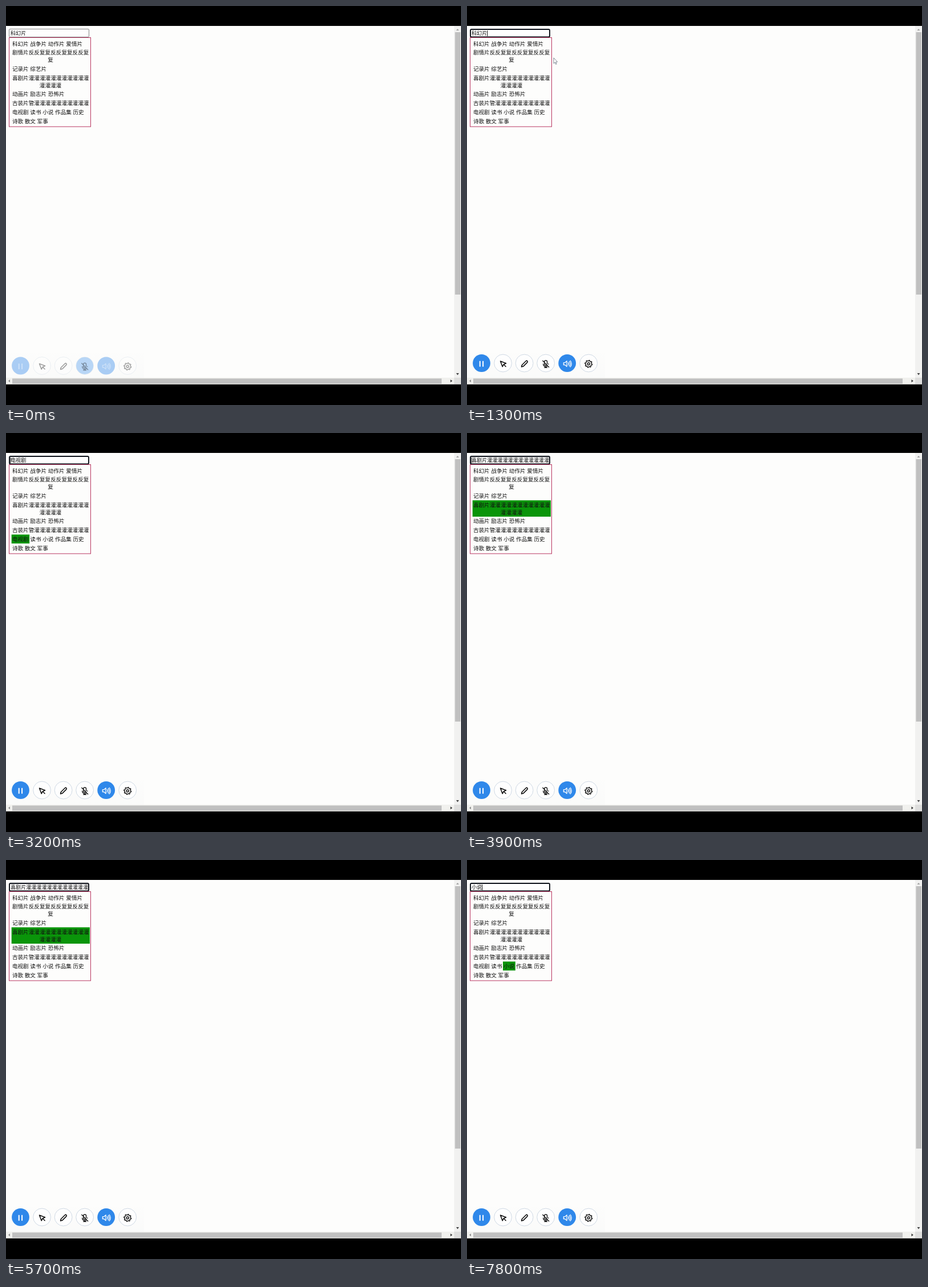
Recreate the animation shown at these times as an HTML page with a canvas. Size 798x701 px, loop 8 s.

```html
<!DOCTYPE html>
<html lang="zh">
<head>
<meta charset="utf-8">
<style>
html, body { margin: 0; width: 100%; height: 100%; overflow: hidden; background: #000; }
canvas { display: block; width: 798px; height: 701px; }
</style>
</head>
<body>
<canvas id="stage"></canvas>
<script>
const W = 798, H = 701, LOOP = 8000;
const canvas = document.getElementById('stage');
const dpr = window.devicePixelRatio || 1;
canvas.width = W * dpr;
canvas.height = H * dpr;
const ctx = canvas.getContext('2d');

const FONT = '"Noto Sans CJK SC", "Noto Sans CJK", sans-serif';
const PAGE = '#fdfdfc', BLUE = '#2f88ea', INK = '#111';
const CHAR = 9.62, PITCH = 15.72, WRAP = 13;

const ROWS = [
  ['科幻片', '战争片', '动作片', '爱情片'],
  ['剧情片反反复复反反复复反反复复'],
  ['记录片', '综艺片'],
  ['喜剧片' + '灌'.repeat(15)],
  ['动画片', '励志片', '恐怖片'],
  ['古装片管' + '灌'.repeat(10)],
  ['电视剧', '读书', '小说', '作品集', '历史'],
  ['诗歌', '散文', '军事']
];

// Lay the words out in rows, long ones wrapped after 14 characters
const items = [];
const rowStart = [];
let rowY = 58.1;
for (const row of ROWS) {
  let x = 9.7;
  rowStart.push(items.length);
  for (const text of row) {
    const lines = text.length > 14 ? [text.slice(0, 14), text.slice(14)] : [text];
    const w = lines[0].length * CHAR + 2.6;
    items.push({ text, lines, x, y: rowY, w, h: PITCH + (lines.length - 1) * WRAP });
    x += w;
  }
  rowY += items[items.length - 1].h;
}

// Key presses: [time, item index, caret at end]
const keys = [];
const press = (t, i, atEnd) => keys.push([t, i, atEnd]);
[2000, 2200, 2300, 2400, 2600, 2700, 3000, 3100].forEach((t, r) => press(t, rowStart[r], true));
[3200, 3300, 3400, 3500, 3600, 3900, 4000, 4100, 4200, 4300, 4400, 4500, 4600]
  .forEach((t, n) => press(t, 12 - n, false));
press(4900, 1, true);
press(5000, 2, true);
[5300, 5500, 5700, 5800, 6000, 6800].forEach((t, n) => press(t, rowStart[n + 1], true));
press(7500, 13, true);
press(7800, 14, true);

const FOCUS = 300, SETTLED = 800, HIDE = 2000;
const clamp = v => Math.max(0, Math.min(1, v));
const ease = v => { v = clamp(v); return v * v * (3 - 2 * v); };
const mix = (a, b, p) => a + (b - a) * p;

function box(x, y, w, h, color) {
  ctx.fillStyle = color;
  ctx.fillRect(x, y, w, h);
}

function label(text, x, y, size, align = 'left') {
  ctx.font = size + 'px ' + FONT;
  ctx.textAlign = align;
  ctx.textBaseline = 'alphabetic';
  ctx.fillStyle = INK;
  ctx.fillText(text, x, y);
}

function poly(points, fill, stroke, width = 1) {
  ctx.beginPath();
  points.forEach(([x, y]) => ctx.lineTo(x, y));
  ctx.closePath();
  if (fill) { ctx.fillStyle = fill; ctx.fill(); }
  if (stroke) { ctx.strokeStyle = stroke; ctx.lineWidth = width; ctx.stroke(); }
}

function path(d, color, width = 1.5) {
  ctx.strokeStyle = color;
  ctx.lineWidth = width;
  ctx.lineCap = ctx.lineJoin = 'round';
  ctx.stroke(new Path2D(d));
}

function disc(r, fill, edge) {
  ctx.beginPath();
  ctx.arc(0, 0, r, 0, 7);
  if (fill) { ctx.fillStyle = fill; ctx.fill(); }
  if (edge) { ctx.strokeStyle = edge; ctx.lineWidth = 1; ctx.stroke(); }
}

function drawScrollbars() {
  box(786, 35, 12, 618, '#f1f1f0');
  box(0, 653, 786, 11.5, '#f1f1ee');
  box(786, 653, 12, 11.5, '#dededd');
  box(787.5, 46, 9.5, 461, '#c0c0c0');
  box(11, 654.5, 753, 9, '#c0c0c0');
  poly([[789.5, 43], [792, 40], [794.5, 43]], '#a0a0a0');
  poly([[789.5, 645], [794.5, 645], [792, 648.5]], '#444');
  poly([[7, 656.3], [7, 661.3], [4, 658.8]], '#8c8c8c');
  poly([[779.5, 656.3], [779.5, 661.3], [782.8, 658.8]], '#333');
}

function drawInput(text, focused, caretOn, atEnd) {
  ctx.beginPath();
  if (focused) {
    ctx.roundRect(6, 41, 139, 13.5, 2);
    ctx.strokeStyle = '#0c1018';
    ctx.lineWidth = 1.9;
  } else {
    ctx.roundRect(5.5, 40.5, 140, 14, 1.5);
    ctx.strokeStyle = '#858585';
    ctx.lineWidth = 1;
  }
  ctx.fillStyle = '#fefefe';
  ctx.fill();
  ctx.stroke();
  ctx.save();
  ctx.beginPath();
  ctx.rect(7, 42, 137, 12);
  ctx.clip();
  label(text, 8, 51.2, 9.07);
  if (caretOn) box(atEnd ? 8 + text.length * 9.07 : 7.5, 43, 1, 10, '#111');
  ctx.restore();
}

function drawList(selected) {
  ctx.strokeStyle = '#b83560';
  ctx.lineWidth = 1;
  ctx.strokeRect(5.5, 55.5, 143, 156.5);
  items.forEach((it, i) => {
    if (i === selected) box(it.x, it.y, it.w, it.h, '#0a950a');
    label(it.lines[0], it.x + 1.2, it.y + 11.5, CHAR);
    if (it.lines[1]) label(it.lines[1], 78, it.y + 11.5 + WRAP, CHAR, 'center');
  });
}

const ICONS = [
  () => { box(-3.8, -3.8, 2, 10, '#fff'); box(1.6, -3.8, 2, 10, '#fff'); },
  () => path('M-4.5-3.5L5.5.2L1.2 2.2L-.8 6.2ZM1.5 2.5L5 6', INK, 1.6),
  () => path('M-5 6.5L-4.2 3.2L2.8-3.8Q4-5 5.2-3.8Q6.3-2.6 5.1-1.4L-1.8 5.6Z', INK, 1.6),
  () => path('M-2.3-1.5V-2.5A2.3 2.3 0 0 1 2.4-2.5V1.3M-2.3.2V1.5A2.3 2.3 0 0 0 1.2 3.6' +
    'M-4.5 1.5A4.5 4.5 0 0 0 2.6 5.2M4.6 1.2V1.8M0 6V7.8M-2.3 7.8H2.3M-5.3-4.2L5.5 7', INK, 1.4),
  () => path('M-6.3-.8H-4L-.6-3.8V6L-4 3H-6.3ZM1.8-1A3 3 0 0 1 1.8 3.2M3.6-3A5.6 5.6 0 0 1 3.6 5.2' +
    'M5.4-4.4A8 8 0 0 1 5.4 6.6', '#fff', 1.3),
  drawGear
];

function drawGear() {
  ctx.translate(0, 1.2);
  const pts = [];
  for (let i = 0; i < 32; i++) {
    const a = (i + 0.5) / 32 * Math.PI * 2;
    const r = i % 4 < 2 ? 6.4 : 4.9;
    pts.push([Math.cos(a) * r, Math.sin(a) * r]);
  }
  ctx.lineJoin = 'round';
  poly(pts, null, INK, 1.4);
  ctx.lineWidth = 1.4;
  ctx.beginPath();
  ctx.arc(0, 0, 2, 0, 7);
  ctx.stroke();
}

function drawToolbar(t) {
  const p = ease((t - 50) / 400);
  const shade = ctx.createLinearGradient(0, 600, 0, 653);
  shade.addColorStop(0, 'rgba(20,50,80,0)');
  shade.addColorStop(1, 'rgba(20,50,80,0.012)');
  box(0, 600, 242, 53, shade);
  ICONS.forEach((icon, i) => {
    const blue = i === 0 || i === 4;
    ctx.save();
    ctx.translate(25.5 + i * 37.55, mix(632, 627.5, p));
    ctx.globalAlpha = mix(0.4, 1, p);
    disc(15.4, blue ? BLUE : '#fefefe', blue ? null : '#cfd9e4');
    if (i === 3 && p < 1) {
      ctx.globalAlpha = 0.33 * (1 - p);
      disc(15, BLUE);
      ctx.globalAlpha = mix(0.4, 1, p);
    }
    icon();
    ctx.restore();
  });
}

function drawPointer(t) {
  if (t < 100 || t >= HIDE) return;
  const inward = ease((t - 100) / 200), outward = ease((t - FOCUS) / (SETTLED - FOCUS));
  const x = mix(mix(240, 100, inward), 152, outward);
  const y = mix(mix(150, 48, inward), 91, outward);
  ctx.save();
  ctx.translate(x, y);
  ctx.lineJoin = 'miter';
  poly([[0, 0], [0, 10], [2.2, 8], [3.8, 11.5], [5.2, 10.8], [3.7, 7.4], [6.6, 7.2]], '#fff', '#777f8c', 0.9);
  ctx.restore();
}

function draw(t) {
  let key = null;
  for (const k of keys) if (k[0] <= t) key = k;
  const focused = t >= FOCUS;
  const since = t - (key ? key[0] : FOCUS);
  const caretOn = focused && Math.floor(since / 500) % 2 === 0;

  ctx.setTransform(dpr, 0, 0, dpr, 0, 0);
  box(0, 0, W, H, '#000');
  box(0, 35, W, 629.5, PAGE);
  drawScrollbars();
  drawInput(key ? items[key[1]].text : '科幻片', focused, caretOn, key ? key[2] : true);
  drawList(key ? key[1] : -1);
  drawToolbar(t);
  drawPointer(t);
}

let start = null;
function tick(now) {
  if (start === null) start = now;
  draw((now - start) % LOOP);
  requestAnimationFrame(tick);
}
draw(0);
requestAnimationFrame(tick);
</script>
</body>
</html>
```
